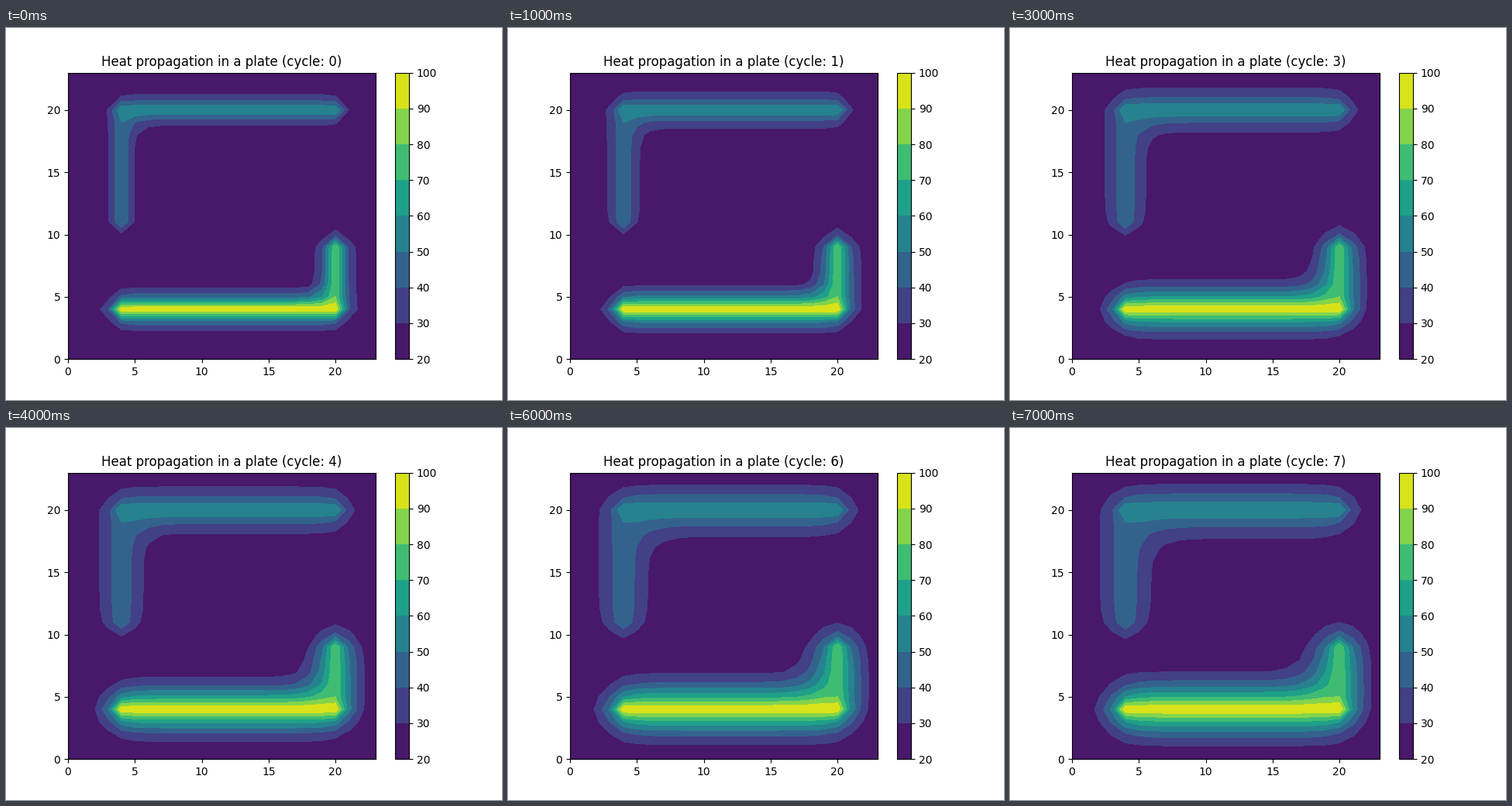
These frames come from a looping animation (640x480 px, 8000 ms). A matplotlib script:

```python
import numpy as np
import matplotlib.pyplot as plt
from matplotlib.animation import FuncAnimation

SIZE = 24
AMBIENT = 20.0
RATE = 0.2
WARM_UP = 2
CYCLES = 8
LEVELS = np.arange(20, 101, 10)


def heat_bars(t):
    """Hold the four heated bars at their fixed temperatures."""
    t[11:20, 4] = 50
    t[20, 4:21] = 60
    t[5:10, 20] = 80
    t[4, 4:21] = 100


def step(t):
    """One diffusion step; the rim of the plate stays at ambient."""
    new = t.copy()
    mid = t[1:-1, 1:-1]
    around = t[:-2, 1:-1] + t[2:, 1:-1] + t[1:-1, :-2] + t[1:-1, 2:]
    new[1:-1, 1:-1] = mid + RATE * (around - 4 * mid)
    heat_bars(new)
    return new


def simulate():
    t = np.full((SIZE, SIZE), AMBIENT)
    heat_bars(t)
    for _ in range(WARM_UP):
        t = step(t)
    plates = [t]
    while len(plates) < CYCLES:
        plates.append(step(plates[-1]))
    return plates


plates = simulate()
fig, ax = plt.subplots(figsize=(6.4, 4.8), dpi=100)


def draw(cycle):
    for old in list(ax.collections):
        old.remove()
    ax.set_title(f"Heat propagation in a plate (cycle: {cycle})")
    return ax.contourf(plates[cycle], levels=LEVELS, cmap="viridis")


fig.colorbar(draw(0), ax=ax)


def update(cycle):
    draw(cycle)
    return []


anim = FuncAnimation(fig, update, frames=CYCLES, interval=1000,
                     repeat=True, repeat_delay=0, blit=False)
plt.show()
```
